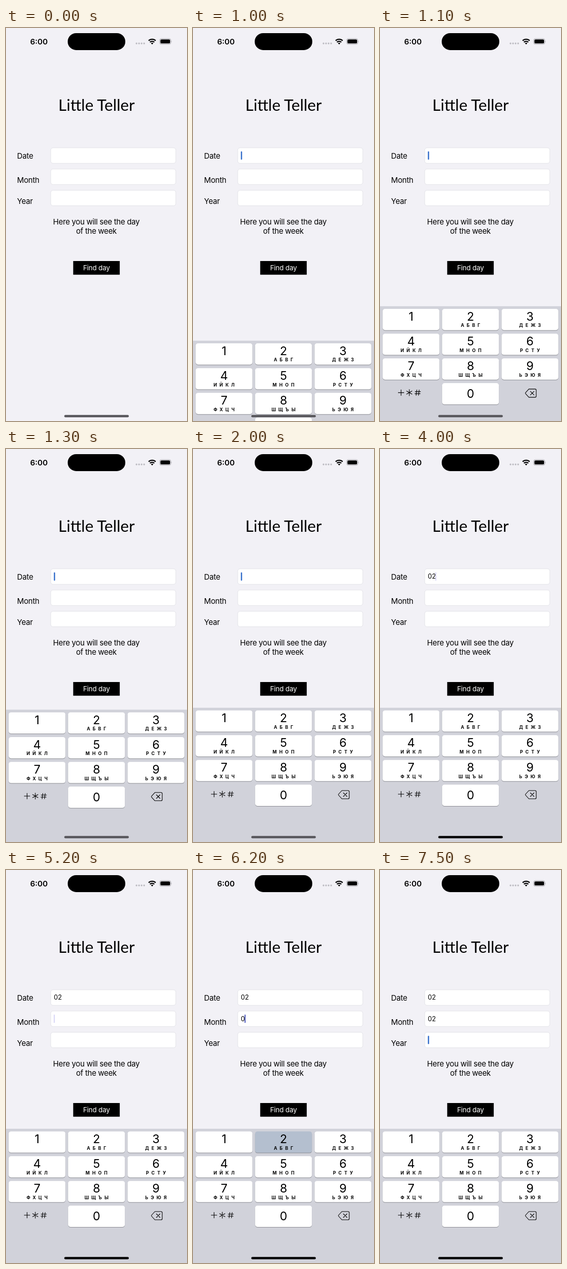
Write an HTML page that moves like this. It is 352x764 px and loops after 8000 ms.

```html
<!DOCTYPE html>
<html lang="en">
<head>
<meta charset="utf-8">
<title>Little Teller</title>
<style>
  html, body { margin: 0; width: 100%; height: 100%; overflow: hidden; background: #f2f1f6; }
  svg { display: block; width: 100vw; height: 100vh; }
  text { font-family: Inter, Roboto, sans-serif; fill: #000; }
  .mid { text-anchor: middle; }
  .title { font: 31px Lato, "Open Sans", sans-serif; }
  .body { font-size: 14.8px; letter-spacing: -.3px; }
  .field { fill: #fff; stroke: #e3e3e8; }
  .value { font-size: 12.5px; }
  .button { font-size: 13.3px; letter-spacing: -.2px; fill: #fff; }
  .clock { font-size: 15px; font-weight: 600; }
  .digit { font-size: 23px; }
  .letters { font-size: 8.6px; font-weight: 700; letter-spacing: 5px; }
  .line { fill: none; stroke: #000; stroke-width: 1.1; stroke-linecap: round; stroke-linejoin: round; }
</style>
</head>
<body>
<svg viewBox="0 0 352 764">
  <rect width="352" height="764" fill="#f2f1f6"/>

  <g id="status">
    <text class="clock mid" x="64" y="31.6">6:00</text>
    <rect x="120" y="10" width="112" height="32.9" rx="16.4"/>
    <path d="M253.8 30h15" stroke="#bdbcc2" stroke-width="3.4" stroke-linecap="round" stroke-dasharray="0 4.95"/>
    <g fill="none" stroke="#000" stroke-width="2.3">
      <path d="M277.4 24.6a9.6 9.6 0 0 1 13.6 0"/>
      <path d="M280 27.6a6 6 0 0 1 8.4 0"/>
    </g>
    <path d="M281.9 29.6a3.4 3.4 0 0 1 4.6 0l-2.3 2.4z"/>
    <rect x="298.8" y="20.8" width="21.8" height="10.8" rx="3.4" fill="none" stroke="#a4a3a8"/>
    <rect x="300.3" y="22.3" width="18.8" height="7.8" rx="2.2"/>
    <path d="M321.7 24.4q1.5 1.8 0 3.6z" fill="#a4a3a8"/>
  </g>

  <text class="title mid" x="176" y="160.5">Little Teller</text>

  <g id="form"></g>
  <rect id="caret"/>

  <text class="body mid" x="175.7" y="382">Here you will see the day</text>
  <text class="body mid" x="175.7" y="400">of the week</text>
  <rect x="130.7" y="453" width="90.5" height="26.6"/>
  <text class="button mid" x="176" y="471.2">Find day</text>

  <g id="keyboard">
    <rect y="503" width="352" height="270" fill="#d1d2da"/>
    <g id="keys"></g>
    <g class="line">
      <path d="M35.5 671h11M41 665.5v11"/>
      <path d="M57 665v12M51.8 668l10.4 6M51.8 674l10.4-6"/>
      <path d="M71.6 665.7l-1.4 10.6M76.2 665.7l-1.4 10.6M68.4 669h10.4M67.8 673h10.4"/>
      <path d="M289.5 664h12a2.3 2.3 0 0 1 2.3 2.3v11.4a2.3 2.3 0 0 1-2.3 2.3h-12l-6.4-7q-.7-1 0-2z"/>
      <path d="M292.5 668.5l7 7M299.5 668.5l-7 7"/>
    </g>
  </g>
  <rect id="homeBar" x="113.3" y="752.2" width="125.6" height="4.6" rx="2.3"/>
</svg>

<script>
const LOOP = 8000, STEP = 100, KEYBOARD_HEIGHT = 261;
const el = id => document.getElementById(id);

const fields = [["Date", 232.9, 254], ["Month", 274.1, 300.8], ["Year", 315.4, 341.8]];
el("form").innerHTML = fields.map(([label, top, base], i) => `
  <text class="body" x="21.6" y="${base}">${label}</text>
  <rect class="field" x="87" y="${top}" width="243.2" height="30.2" rx="4.5"/>
  <text class="value" id="value${i}" x="93" y="${top + 19.4}"></text>`).join("");

const letters = ["", "АБВГ", "ДЕЖЗ", "ИЙКЛ", "МНОП", "РСТУ", "ФХЦЧ", "ШЩЪЫ", "ЬЭЮЯ"];
function key(digit, col, row, caption) {
  const x = 5.2 + col * 115.6, y = 508.2 + row * 48.1, center = x + 55.2;
  const box = `x="${x}" width="110.4" height="41.4" rx="4.6"`;
  return `<rect ${box} y="${y + 1}" fill="#8c8d94"/>
    <rect ${box} y="${y}" id="key${digit}" fill="#fff"/>
    <text class="digit mid" x="${center}" y="${y + (digit ? 23 : 28.3)}">${digit}</text>
    <text class="letters mid" x="${center + 2.5}" y="${y + 35.4}">${caption}</text>`;
}
el("keys").innerHTML = letters
  .map((caption, i) => key(i + 1, i % 3, Math.floor(i / 3), caption))
  .join("") + key(0, 1, 3, "");

// Caret looks: hidden, faint, dimmed, full.
const looks = [["none", 0], ["#cccaf3", 1.5], ["#3b49b8", 1.8], ["#3a72cc", 2.5]];
const blink = [
  [0, 0], [900, 3], [1400, 2], [1500, 1], [1600, 0], [1800, 1], [1900, 2], [2000, 3],
  [3100, 2], [3200, 3], [3700, 2], [3800, 1], [3900, 0], [4000, 1], [4100, 2], [4200, 3],
  [5200, 1], [5300, 0], [5400, 1], [5500, 3], [6200, 2], [6300, 3],
  [6900, 1], [7000, 0], [7200, 1], [7300, 3]
];
const focus = [[0, 0], [4600, 1], [7500, 2]];
const typing = [
  [[0, ""], [2500, "0"], [3200, "02"]],
  [[0, ""], [5600, "0"], [6300, "02"]],
  [[0, ""]]
];
const presses = { 0: [[2400, 2500], [5500, 5600]], 2: [[3000, 3200], [6100, 6300]] };

const at = (track, t) => track.findLast(([start]) => start <= t)[1];

// Critically damped spring that starts at 856 ms.
function keyboardOffset(t) {
  const x = Math.max(0, t - 856) * 0.014;
  return KEYBOARD_HEIGHT * (1 + x) * Math.exp(-x);
}

function draw(now) {
  const t = Math.floor((now % LOOP) / STEP) * STEP;
  el("keyboard").setAttribute("transform", `translate(0 ${keyboardOffset(t).toFixed(2)})`);
  el("homeBar").setAttribute("fill", t < 2400 ? "#57565b" : "#000");

  typing.forEach((track, i) => { el("value" + i).textContent = at(track, t); });
  for (const digit in presses) {
    const down = presses[digit].some(([from, to]) => t >= from && t < to);
    el("key" + digit).setAttribute("fill", down ? "#b4bfcf" : "#fff");
  }

  const active = at(focus, t), [fill, width] = looks[at(blink, t)];
  const caret = { x: 93 + 7.4 * at(typing[active], t).length, y: fields[active][1] + 6.9, width, height: 16.2, rx: width / 2, fill };
  for (const name in caret) el("caret").setAttribute(name, caret[name]);
}

let start;
function tick(now) {
  start ??= now;
  draw(now - start);
  requestAnimationFrame(tick);
}
draw(0);
requestAnimationFrame(tick);
</script>
</body>
</html>
```
